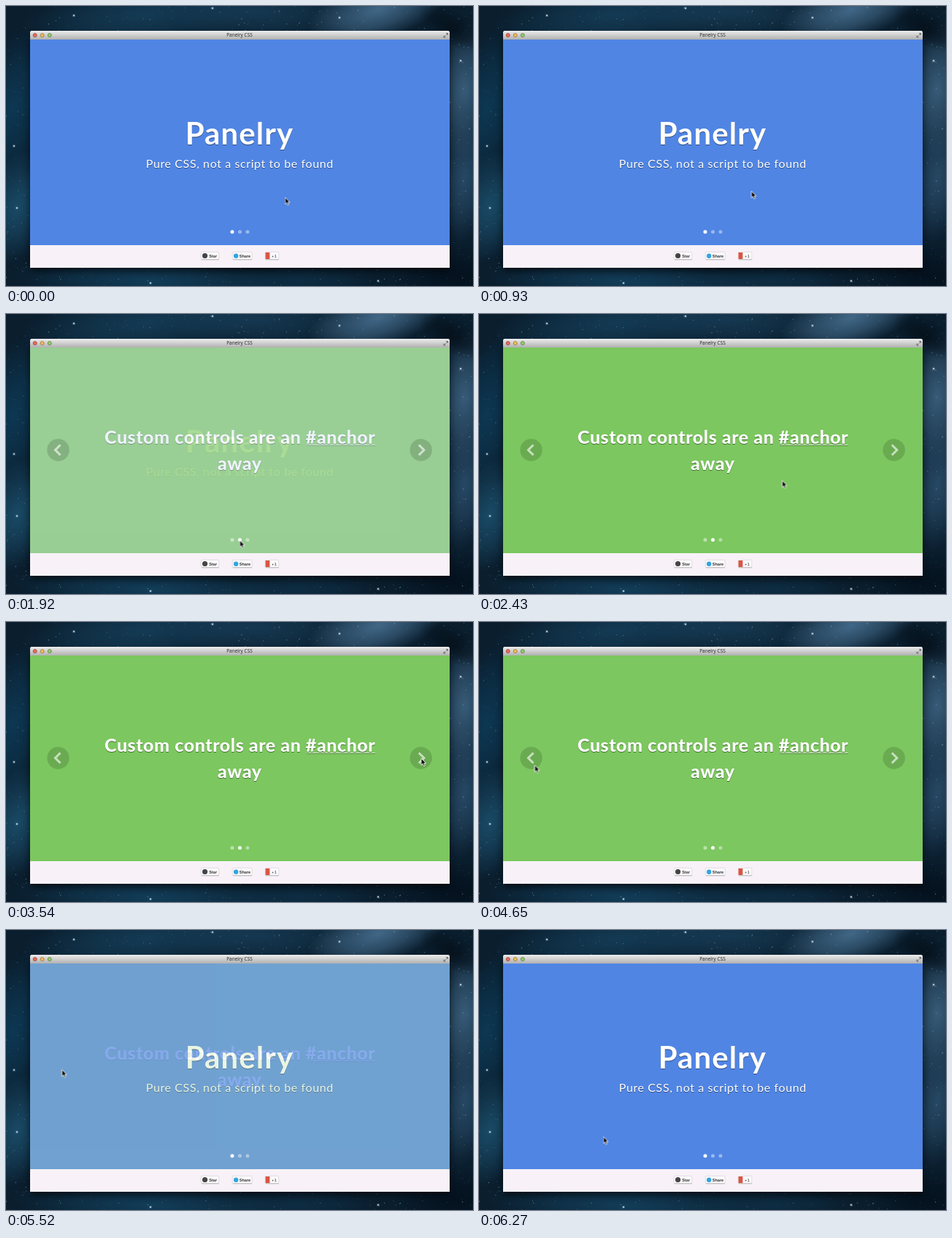
These frames come from a looping animation (640x384 px, 6.3 s). An HTML page with a canvas:

```html
<!DOCTYPE html>
<html lang="en">
<head>
<meta charset="utf-8">
<title>Panelry CSS</title>
<style>
  html, body { margin: 0; width: 100%; height: 100%; overflow: hidden; background: #0b2134; }
  canvas, svg { position: absolute; left: 0; top: 0; width: 640px; height: 384px; }
  text { font-family: Lato, "Open Sans", sans-serif; }
  .slide text { fill: #fff; text-anchor: middle; filter: drop-shadow(0 1px 0 rgba(0,0,0,.45)); }
  .title { font-size: 42px; font-weight: 700; letter-spacing: 1.1px; }
  .sub { font-size: 16px; letter-spacing: .6px; }
  .line { font-size: 25px; font-weight: 800; letter-spacing: .55px; }
  .tiny { font: 700 5.6px "Liberation Sans", Arial, sans-serif; fill: #333; }
</style>
</head>
<body>
<canvas id="sky" width="640" height="384"></canvas>
<svg viewBox="0 0 640 384">
  <defs>
    <linearGradient id="bar" x2="0" y2="1">
      <stop offset="0" stop-color="#ededed"/><stop offset="1" stop-color="#b0b0b0"/>
    </linearGradient>
    <filter id="soft" x="-10%" y="-10%" width="120%" height="125%"><feGaussianBlur stdDeviation="5"/></filter>
    <clipPath id="stage"><rect x="33" y="46" width="575" height="282"/></clipPath>
  </defs>

  <rect x="33" y="44" width="575" height="320" rx="4" fill="#000" opacity=".55" filter="url(#soft)"/>
  <path d="M33 359V37a3 3 0 0 1 3-3H605a3 3 0 0 1 3 3V359Z" fill="#f8f2f8"/>
  <path d="M33 46V37a3 3 0 0 1 3-3H605a3 3 0 0 1 3 3V46Z" fill="url(#bar)"/>
  <g stroke-width=".7">
    <circle cx="39.7" cy="40" r="2.5" fill="#ee6a5c" stroke="#8f3a33"/>
    <circle cx="49.7" cy="40" r="2.5" fill="#f0bd58" stroke="#8f6c2c"/>
    <circle cx="59.8" cy="40" r="2.5" fill="#9acb70" stroke="#4d7336"/>
  </g>
  <text x="320" y="42.3" text-anchor="middle" style="font:6.5px 'Open Sans',sans-serif" fill="#222">Panelry CSS</text>
  <path d="M603 37.5h2.5V40M605.5 37.5L602.8 40.2M600 40.5V43h2.5M600 43L602.4 40.6" fill="none" stroke="#666" stroke-width=".9"/>

  <g clip-path="url(#stage)">
    <rect x="33" y="46" width="575" height="282" fill="#fff"/>
    <g id="blue" class="slide">
      <rect x="33" y="46" width="575" height="282" fill="#5085e4"/>
      <text class="title" x="320" y="190">Panelry</text>
      <text class="sub" x="320.3" y="222">Pure CSS, not a script to be found</text>
    </g>
    <g id="green" class="slide">
      <rect x="33" y="46" width="575" height="282" fill="#7cc75f"/>
      <path d="M412 180.5H506" stroke="#56893f"/>
      <path d="M412 179.5H506" stroke="#fff" opacity=".7"/>
      <text class="line" x="320.7" y="178">Custom controls are an #anchor</text>
      <text class="line" x="320.3" y="214">away</text>
    </g>
    <g id="arrows">
      <circle cx="71.5" cy="186.5" r="15.2" opacity=".14"/>
      <circle cx="568.7" cy="186.5" r="15.2" opacity=".14"/>
      <path d="M74.5 179.5L67.5 186.5L74.5 193.5M565.8 179.5L572.8 186.5L565.8 193.5" fill="none" stroke="#fff" stroke-width="3" opacity=".62"/>
    </g>
    <g fill="#fff">
      <circle id="dot1" cx="310" cy="309.8" r="2.5"/>
      <circle id="dot2" cx="320.5" cy="309.8" r="2.5"/>
      <circle cx="331" cy="309.8" r="2.5" opacity=".42"/>
    </g>
  </g>

  <g fill="#fcfafc" stroke="#cfc9d0" stroke-width=".6">
    <rect x="267.3" y="337.3" width="24.5" height="10.4" rx="1.2"/>
    <rect x="310.3" y="337.3" width="26.8" height="10.4" rx="1.2"/>
    <rect x="355.3" y="337.3" width="18.5" height="10.4" rx="1"/>
  </g>
  <path d="M268 347.8H292M311 347.8H337M356 347.8H374" stroke="#aaa5ab" stroke-width=".7"/>
  <circle cx="272.6" cy="342.5" r="3.6" fill="#444"/>
  <circle cx="315.2" cy="342.7" r="3.2" fill="#32a5e0"/>
  <rect x="355.6" y="338" width="5.8" height="9" fill="#db5442"/>
  <text class="tiny" x="278.2" y="344.7">Star</text>
  <text class="tiny" x="319.7" y="344.7">Share</text>
  <text class="tiny" x="364" y="344.5" style="font-weight:400;font-size:6px">+1</text>

  <path id="cursor" d="M0 0V9.2L2.1 7.3L3.6 10.6L5.2 9.9L3.8 6.7H6.6Z" fill="#0a0a0a" stroke="#f4f4f4" stroke-width=".9" stroke-linejoin="round"/>
</svg>
<script>
const LOOP = 6300, NEXT = 1765, BACK = 5330, FADE = 360;
const $ = id => document.getElementById(id);

// steps: [ms, properties, easing towards the next step]
function play(el, steps) {
  el.animate(steps.map(([ms, props, easing = 'linear']) =>
    ({ offset: ms / LOOP, easing, ...props })), { duration: LOOP, iterations: Infinity });
}

function swap(el, first, second, span, easing, lag = 0) {
  const a = { opacity: first }, b = { opacity: second };
  play(el, [[0, a], [NEXT + lag, a, easing], [NEXT + lag + span, b],
    [BACK, b, easing], [BACK + span, a], [LOOP, a]]);
}

swap($('blue'), 1, 0, FADE, 'ease');
swap($('green'), 0, 1, FADE, 'ease', 20);
swap($('arrows'), 0, 1, 1, 'linear');
swap($('dot1'), 1, .48, 70, 'linear');
swap($('dot2'), .42, 1, 70, 'linear');

const path = [
  [0, 382.5, 262.5], [690, 382.5, 262.5], [860, 376, 251], [1320, 320.5, 310.5],
  [1980, 320.5, 310.5], [2430, 415.5, 228.5], [2900, 520, 150], [3250, 569, 187],
  [3780, 569, 187], [4200, 330, 192], [4600, 80, 196], [4650, 76.5, 196.5],
  [5000, 72.5, 187.5], [5450, 72.5, 187.5], [5940, 170.5, 283.5], [LOOP, 170.5, 283.5]
];
play($('cursor'), path.map(([ms, x, y]) =>
  [ms, { transform: `translate(${x}px, ${y}px)` }, 'ease-in-out']));

// Night sky: dark base, soft tilted clouds, seeded stars
const g = $('sky').getContext('2d');
let seed = 41;
const rnd = () => (seed = seed * 16807 % 2147483647) / 2147483647;
g.fillStyle = '#0a1e2e';
g.fillRect(0, 0, 640, 384);

function cloud(x, y, rx, ry, tilt, rgb, a) {
  g.save();
  g.translate(x, y);
  g.rotate(tilt);
  g.scale(rx, ry);
  const c = g.createRadialGradient(0, 0, 0, 0, 0, 1);
  c.addColorStop(0, `rgba(${rgb},${a})`);
  c.addColorStop(.5, `rgba(${rgb},${a * .6})`);
  c.addColorStop(1, `rgba(${rgb},0)`);
  g.fillStyle = c;
  g.fillRect(-1, -1, 2, 2);
  g.restore();
}
cloud(10, 140, 50, 110, .2, '14,66,98', .7);
cloud(15, 275, 50, 80, .3, '30,88,120', .75);
cloud(190, 12, 170, 45, -.1, '22,66,94', .8);
cloud(350, 8, 130, 40, 0, '28,72,102', .6);
cloud(510, 5, 100, 42, -.3, '74,116,150', .85);
cloud(628, 115, 45, 95, .1, '66,106,138', .8);
cloud(628, 235, 40, 90, .1, '48,86,118', .75);
cloud(200, 378, 190, 38, .05, '20,68,98', .8);
cloud(400, 378, 110, 30, 0, '16,54,80', .6);
cloud(612, 30, 50, 24, .5, '5,16,26', .85);
cloud(620, 370, 90, 45, 0, '4,16,28', .9);

function star(x, y, r, a) {
  g.fillStyle = `rgba(205,228,240,${a})`;
  g.beginPath();
  g.arc(x, y, r, 0, 7);
  g.fill();
}
for (let i = 0; i < 1500; i++) star(rnd() * 640, rnd() * 384, .25 + rnd() * .4, .1 + rnd() * .5);
[[457, 16], [463, 212], [93, 13], [11, 192], [15, 277], [623, 75], [198, 380], [510, 377], [283, 3]]
  .forEach(([x, y]) => { star(x, y, 1.1, .9); star(x, y, 2.2, .2); });
</script>
</body>
</html>
```
